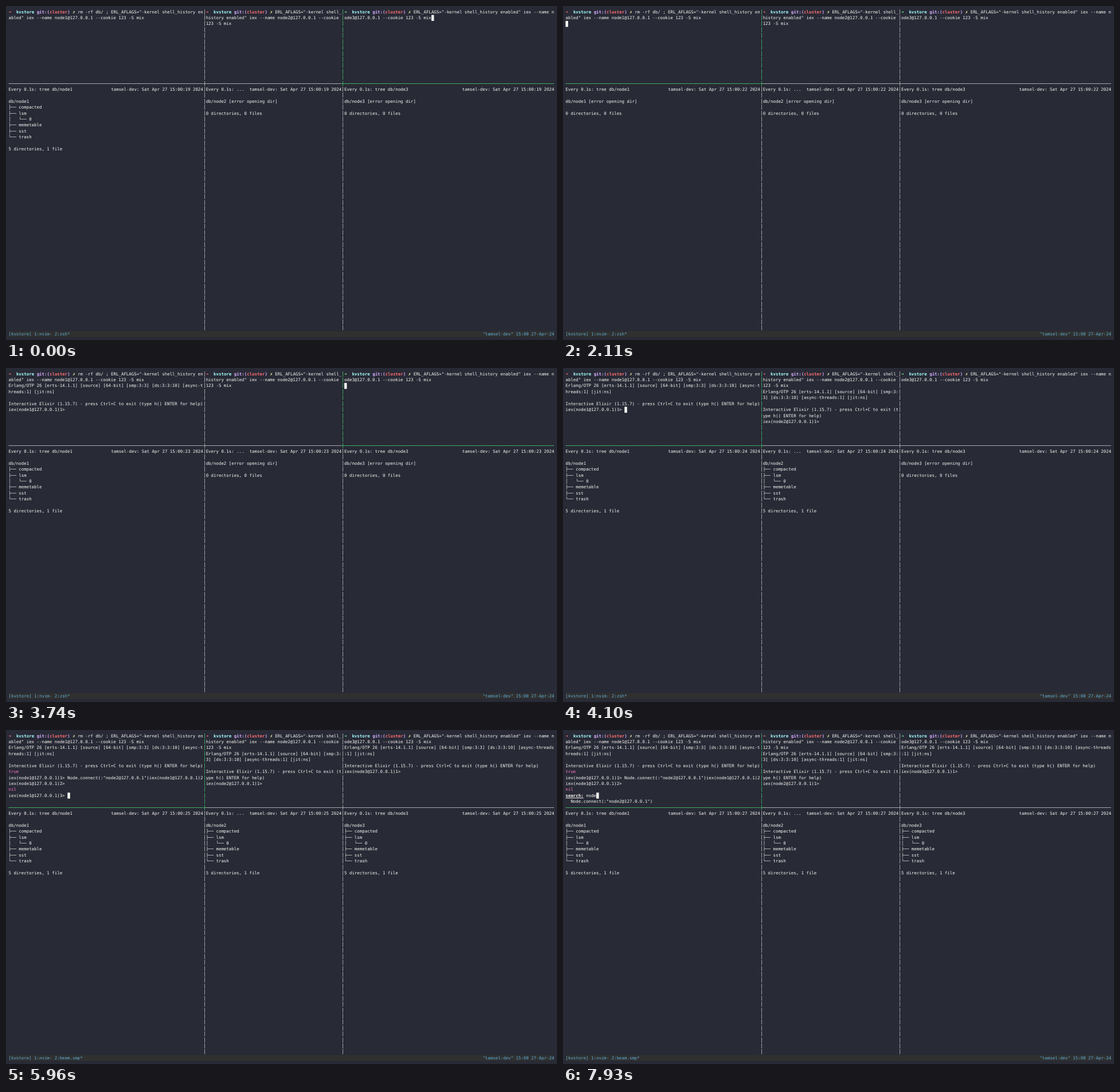
Write an HTML page that moves like this. It is 961 px wide and 583 px high and loops after 8 s.

```html
<!DOCTYPE html>
<html lang="en">
<head>
<meta charset="utf-8">
<title>Terminal session</title>
<style>
  html, body { margin: 0; width: 100%; height: 100%; overflow: hidden; background: #282a36; }
  svg { display: block; width: 961px; height: 583px; }
  text {
    font-family: "DejaVu Sans Mono", monospace;
    font-kerning: none;
    font-variant-ligatures: none;
    text-rendering: geometricPrecision;
    white-space: pre;
    fill: #f8f8f2;
  }
  .bold, .ok, .fail, .dir, .git, .branch, .dirty { font-weight: bold; }
  .ok { fill: #69ff94; }
  .fail, .branch { fill: #ff6e6e; }
  .dir { fill: #a4ffff; }
  .git { fill: #d6acff; }
  .dirty { fill: #ffffa5; }
  .atom { fill: #ff79c6; }
  .active { fill: #50fa7b; }
  .status { fill: #5fafd7; }
</style>
</head>
<body>
<svg id="stage" viewBox="0 0 961 583"></svg>
<script>
(() => {
  const LOOP = 8000;
  const COLS = 213, ROWS = 55;
  const CW = 961 / (COLS + 2), RH = 583 / (ROWS + 1);
  const SIZE = CW / 0.60205;
  const SPLIT = 12, STATUS = 54;
  const HOST = 'tamsel-dev';
  const FG = '#f8f8f2';

  const ENV = 'ERL_AFLAGS="-kernel shell_history enabled" iex --name ';
  const BANNER = 'Erlang/OTP 26 [erts-14.1.1] [source] [64-bit] [smp:3:3] [ds:3:3:10] [async-threads:1] [jit:ns]';
  const HELP = 'Interactive Elixir (1.15.7) - press Ctrl+C to exit (type h() ENTER for help)';

  const panes = [
    { col: 0, width: 76, mark: 'fail', pre: 'rm -rf db/ ; ', watch: 'tree db/node1' },
    { col: 77, width: 53, mark: 'fail', pre: '', watch: '...' },
    { col: 131, width: 82, mark: 'ok', pre: '', watch: 'tree db/node3' }
  ];

  // boot, per pane: 0 typed, 1 entered, 2 banner, 3 prompt
  // dirs, per pane: 1 when the database folder exists
  // query: search text, or null while the plain prompt shows
  const steps = [
    [0, { sec: 19, pane: 2, name: 'zsh', boot: '000', dirs: '100', query: null, hit: 0, linked: false }],
    [40, { sec: 20 }],
    [1080, { sec: 21 }],
    [1120, { pane: 1 }],
    [1310, { pane: 0 }],
    [1810, { boot: '100' }],
    [1910, { dirs: '000' }],
    [2110, { sec: 22 }],
    [2620, { boot: '200', name: 'beam.smp' }],
    [2670, { boot: '300', dirs: '100' }],
    [2720, { pane: 1 }],
    [3040, { boot: '310' }],
    [3120, { sec: 23 }],
    [3400, { name: 'bash' }],
    [3440, { pane: 2 }],
    [3740, { boot: '311', name: 'zsh' }],
    [4010, { boot: '321', pane: 1 }],
    [4060, { boot: '331', dirs: '110', sec: 24 }],
    [4100, { pane: 0 }],
    [4660, { boot: '332', name: 'beam.smp' }],
    [4700, { boot: '333', dirs: '111' }],
    [5100, { sec: 25 }],
    [5250, { query: '', hit: 3 }],
    [5530, { query: 'no' }],
    [5640, { query: 'node' }],
    [5740, { query: 'node2', hit: 2 }],
    [5960, { query: null, linked: true }],
    [6040, { sec: 26 }],
    [6870, { query: '', hit: 2 }],
    [7090, { sec: 27 }],
    [7200, { query: 'n' }],
    [7310, { query: 'no' }],
    [7430, { query: 'nod', hit: 0 }],
    [7930, { query: 'node', hit: 2 }]
  ];

  const colX = col => (col + 1) * CW;
  const rowY = row => (row + 0.5) * RH;
  const num = v => v.toFixed(3);

  function rect(col, y, cols, h, fill) {
    return `<rect x="${num(colX(col))}" y="${num(y)}" width="${num(cols * CW)}" height="${num(h)}" fill="${fill}"/>`;
  }

  function put(col, row, str, cls = '') {
    const y = rowY(row) + RH / 1.4;
    return `<text x="${num(colX(col))}" y="${num(y)}" font-size="${num(SIZE)}" class="${cls}">${str}</text>`;
  }

  function borders(active) {
    const p = panes[active];
    const from = p.col - 1, to = p.col + p.width;
    const tone = (col, row) => row <= SPLIT && col >= from && col <= to ? 'active' : '';
    let out = '';
    for (const col of [76, 130]) {
      for (let row = 0; row < STATUS; row++) {
        out += put(col, row, row === SPLIT ? '┼' : '│', tone(col, row));
      }
    }
    for (const q of panes) out += put(q.col, SPLIT, '─'.repeat(q.width), tone(q.col, SPLIT));
    return out;
  }

  function shell(i, s) {
    const p = panes[i], node = `node${i + 1}@127.0.0.1`, boot = +s.boot[i];
    let out = '', row = 0, col = 0;

    const write = (str, cls) => {
      while (str) {
        if (col === p.width) feed();
        const part = str.slice(0, p.width - col);
        out += put(p.col + col, row, part, cls);
        col += part.length;
        str = str.slice(part.length);
      }
    };
    const feed = () => { row++; col = 0; };
    const line = (str, cls) => { write(str, cls); feed(); };
    const prompt = n => `iex(${node})${n}> `;
    const connect = n => `Node.connect(:"node${n}@127.0.0.1")`;

    write('➜', p.mark);
    col = 3;
    write('kvstore', 'dir');
    col++;
    write('git:(', 'git');
    write('cluster', 'branch');
    write(')', 'git');
    col++;
    write('✗', 'dirty');
    col++;
    write(`${p.pre}${ENV}${node} --cookie 123 -S mix`);

    if (boot > 0) feed();
    if (boot > 1) { line(BANNER); feed(); }
    if (boot > 2) {
      line(HELP);
      if (i === 0 && s.linked) {
        line('true', 'atom');
        line(prompt(1) + connect(2) + prompt(2).slice(0, -2));
        line(prompt(2));
        line('nil', 'atom');
      }
      if (i === 0 && s.query !== null) {
        out += rect(p.col, rowY(row) + SIZE * 1.2, 7, 1, FG);
        write('search:', 'bold');
        write(' ' + s.query);
        if (s.hit) out += put(p.col + 2, row + 1, connect(s.hit));
      } else {
        write(prompt(i === 0 && s.linked ? 3 : 1));
      }
    }
    if (s.pane === i) out += rect(p.col + col, rowY(row), 1, RH, FG);
    return out;
  }

  function watch(i, s) {
    const p = panes[i], dir = `db/node${i + 1}`;
    const clock = `${HOST}: Sat Apr 27 15:00:${s.sec} 2024`;
    const list = s.dirs[i] === '1'
      ? [dir, '├── compacted', '├── lsm', '│   └── 0', '├── memetable', '├── sst', '└── trash', '', '5 directories, 1 file']
      : [dir + ' [error opening dir]', '', '0 directories, 0 files'];
    return put(p.col, 13, 'Every 0.1s: ' + p.watch)
      + put(p.col + p.width - clock.length, 13, clock)
      + list.map((str, n) => str && put(p.col, 15 + n, str)).join('');
  }

  function statusBar(s) {
    const info = `"${HOST}" 15:00 27-Apr-24`;
    return rect(0, rowY(STATUS), COLS, RH, '#303030')
      + put(0, STATUS, `[kvstore] 1:nvim- 2:${s.name}*`, 'status')
      + put(COLS - info.length, STATUS, info, 'status');
  }

  const stage = document.getElementById('stage');
  let shown = 0, start = null;

  function draw(t) {
    const count = steps.filter(step => step[0] <= t).length;
    if (count === shown) return;
    shown = count;
    const s = Object.assign({}, ...steps.slice(0, count).map(step => step[1]));
    stage.innerHTML = statusBar(s) + borders(s.pane)
      + panes.map((p, i) => shell(i, s) + watch(i, s)).join('');
  }

  function tick(now) {
    if (start === null) start = now;
    draw((now - start) % LOOP);
    requestAnimationFrame(tick);
  }

  draw(0);
  requestAnimationFrame(tick);
})();
</script>
</body>
</html>
```
